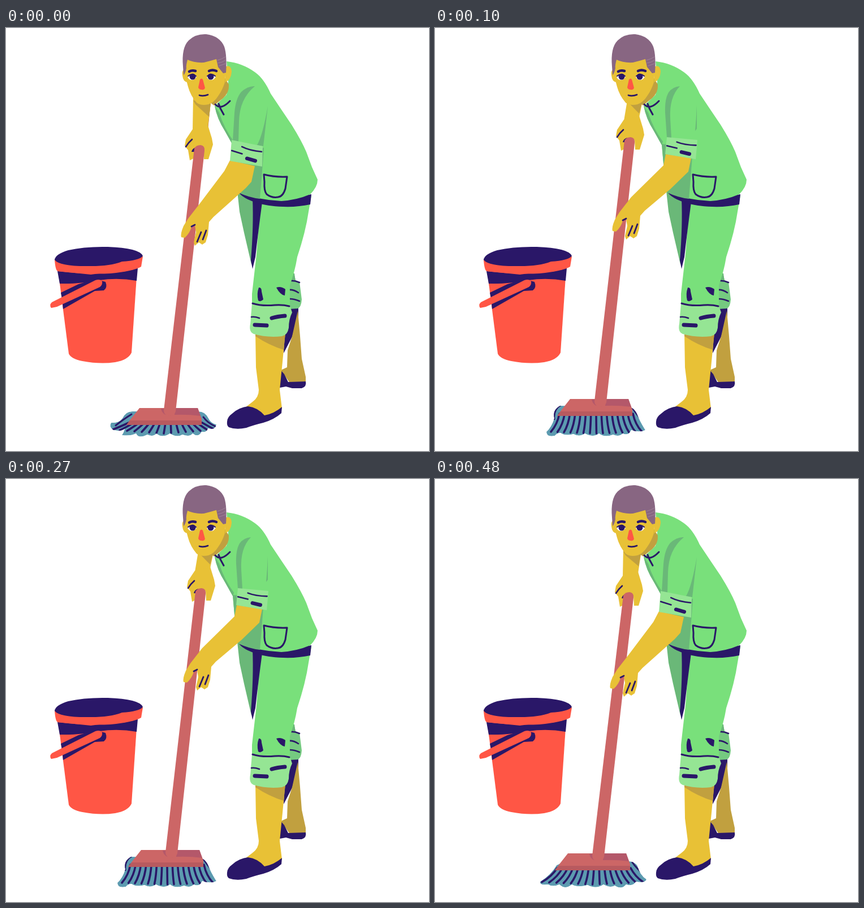
An HTML page with a canvas that plays this animation: 748x748 px, repeating every 0.56 s.

```html
<!DOCTYPE html>
<html lang="en">
<head>
<meta charset="utf-8">
<title>Mopping</title>
<style>
html, body { margin: 0; width: 100%; height: 100%; overflow: hidden; background: #fff; }
canvas { display: block; width: 748px; height: 748px; }
</style>
</head>
<body>
<canvas id="stage" width="748" height="748"></canvas>
<script>
const ctx = document.getElementById('stage').getContext('2d');
const C = {
  skin: '#e8c136', skinDark: '#c1a03f', green: '#79e07b', greenDark: '#6ab878',
  cuff: '#95e594', navy: '#2a1768', hair: '#886682', pink: '#cc6666',
  pinkDark: '#b4586a', band: '#b85a5f', red: '#ff5645', teal: '#5c9bb0', white: '#fff'
};

function fill(d, color) {
  ctx.fillStyle = color;
  ctx.fill(new Path2D(d));
}
function line(d, width = 3, color = C.navy) {
  ctx.strokeStyle = color;
  ctx.lineWidth = width;
  ctx.lineCap = ctx.lineJoin = 'round';
  ctx.stroke(new Path2D(d));
}
function shifted([x, y], draw) {
  ctx.save();
  ctx.translate(x, y);
  draw();
  ctx.restore();
}
const lerp = (a, b, t) => a + (b - a) * t;
const poly = pts => 'M' + pts.map(p => p.join(' ')).join('L') + 'Z';

// Front arm: cuff corners, forearm edges, hand shift, sleeve shadows
const arms = {
  low: {
    cuff: [[399, 198], [454, 209], [453, 245], [396, 235]],
    inner: [[396, 234], [386, 253]], outer: [[424, 283], [434, 272], [440, 244]], hand: [0, 0],
    crease: 'M440 103Q428 102 416 113Q406 125 404 150L401 199L411 201L412 165Q413 125 440 103Z',
    side: 'M463 138L455 209L444 207Q454 190 463 138Z'
  },
  mid: {
    cuff: [[403, 197], [459, 206], [457, 244], [399, 232]],
    inner: [[401, 233], [396, 252]], outer: [[430, 278], [439, 268], [444, 242]], hand: [2, -5],
    crease: 'M437 103Q425 102 415 113Q406 126 405 150L404 198L413 200L413 165Q414 125 437 103Z',
    side: 'M463 138L459 206L453 205Q460 180 463 138Z'
  },
  high: {
    cuff: [[410, 193], [464, 198], [461, 232], [407, 223]],
    inner: [[408, 223], [404, 243]], outer: [[416, 285], [448, 254], [453, 230]], hand: [4, -11],
    crease: 'M433 103Q420 104 413 114Q406 126 407 150L410 194L418 194L416 160Q414 122 433 103Z',
    side: 'M463 137L463 178L460 182Q462 160 463 137Z'
  },
  top: {
    cuff: [[408, 194], [463, 197], [461, 230], [405, 222]],
    inner: [[407, 222], [403, 242]], outer: [[415, 283], [448, 254], [452, 229]], hand: [5, -23],
    crease: 'M426 105Q413 106 406 117Q400 130 401 150Q403 175 407 195L417 195Q411 170 411 145Q411 120 426 105Z',
    side: 'M463 137L461 197L456 196Q460 170 463 137Z'
  }
};

// Mop: plate shift, handle top shift, back hand shift, forearm top, bristles
const mops = {
  low: {
    plate: [0, 0], grip: [0, 0], hand: [0, 0], sleeve: 331, tips: [188, 370], bend: .55,
    hair: 'M226 678Q212 677 206 690Q200 699 186 698Q181 705 190 711Q204 714 210 709Q208 716 205 720Q220 722 230 717Q234 727 250 719Q260 724 266 717Q276 726 290 717Q302 725 312 719Q325 724 330 717Q340 725 346 714Q355 716 357 708Q370 712 372 701Q362 699 358 690Q352 678 340 678Z'
  },
  mid: {
    plate: [-1, -10], grip: [0, -7], hand: [2, -8], sleeve: 333, tips: [189, 368], bend: .35,
    hair: 'M215 683Q205 700 186 712Q184 719 200 717Q208 722 220 717Q230 727 242 717Q252 723 270 718Q285 726 298 717Q310 724 318 719Q330 727 338 717Q350 721 355 712Q372 715 374 708Q362 700 358 684Q352 676 343 676L230 676Z'
  },
  high: {
    plate: [3, -16], grip: [2, -14], hand: [4, -17], sleeve: 341, tips: [205, 366], bend: .25,
    hair: 'M221 668Q207 676 211 690Q206 706 197 714Q197 724 212 721Q216 716 222 716Q230 722 245 718Q255 724 265 717Q280 725 290 717Q300 725 315 719Q325 724 332 717Q342 722 347 711Q362 716 372 711Q362 695 357 682Q352 672 344 670Z'
  },
  top: {
    plate: [2, -25], grip: [2, -21], hand: [4, -25], sleeve: 340, tips: [210, 369], bend: .15,
    hair: 'M222 655Q205 664 208 680Q202 694 207 705Q212 712 205 722Q214 729 222 716L230 708Q236 714 231 724Q240 729 244 712Q255 709 262 718Q270 712 275 716Q277 728 289 725Q290 715 297 712Q310 722 322 711Q330 722 340 714Q350 724 358 720Q368 728 374 718Q364 705 360 690Q362 672 353 660Q350 650 340 652Z'
  }
};

// [end time in ms, mop pose, arm pose]
const steps = [
  [70, 'low', 'low'], [100, 'mid', 'mid'], [170, 'high', 'high'], [270, 'top', 'top'],
  [330, 'high', 'high'], [360, 'mid', 'mid'], [560, 'mid', 'low']
];

function bucket() {
  fill('M92 428L111 576Q115 585 135 589Q166 595 193 591Q216 587 222 574L232 425Z', C.red);
  fill('M91 430L95 452Q130 453 165 446Q198 441 231 447L233 425L150 436Z', C.navy);
  fill('M86 409Q87 427 91 430Q140 436 185 434Q225 430 239 422L242 404Z', C.red);
  fill('M86 410Q87 400 110 393Q140 386 180 387Q236 389 242 403Q236 411 205 413Q185 421 150 421Q95 422 86 410Z', C.navy);
  fill('M97 468L128 453L158 444L176 449Q180 459 173 464L157 465L101 497L99 478Z', C.navy);
  fill('M98 452L126 453L97 464Z', C.red);
  fill('M81 485Q76 490 80 495L90 493L166 458Q171 454 170 448Q166 443 158 446Z', C.red);
}

function legs() {
  fill('M409 288L413 325L421 362L434 418L448 312L460 300Z', C.greenDark);
  fill('M502 494L517 494L517 510L506 546L491 575L492 540Z', C.navy);
  fill('M516 500L520 545L523 585L530 617L530 626L503 629L486 605L497 600L498 570L506 545Z', C.skinDark);
  fill('M485 604L492 612L499 626L530 625Q532 634 523 637L506 637L495 634L479 637Z', C.navy);
  fill('M500 440L510 438L512 446L519 449L523 480Q522 494 516 496L500 497Z', '#75ca80');
  fill('M501 432L510 434L512 448L500 449Z', C.greenDark);
  line('M500 447Q510 446 519 450M500 463Q508 462 517 468M502 479Q510 479 519 483', 2.6);

  fill('M441 538L442 600L447 640Q447 653 436 661L423 671L459 688L488 673L484 640L489 590L494 538Z', C.skin);
  fill('M441 540L494 540L491 569Q465 561 441 545Z', C.skinDark);
  fill('M391 696Q391 688 401 681Q412 671 428 669Q445 671 457 685Q474 682 488 670L487 681Q475 692 455 698Q438 702 425 707Q407 711 394 706Q390 703 391 696Z', C.navy);

  fill('M450 305L443 400L435 470L435 490L502 492L502 455Q511 430 515 405Q530 360 535 325L540 296Z', C.green);
  fill('M436 302L453 308Q446 360 441 405L436 426L433 411Q438 350 436 302Z', C.navy);
  fill('M410 289Q440 299 490 303L540 294L538 312Q515 317 490 316Q460 315 445 309Q420 303 410 289Z', C.navy);
  fill('M435 487L502 491L506 503Q500 515 500 530Q498 543 488 545Q462 548 438 541Q429 537 432 523Z', C.cuff);
  line('M436 487Q452 492 475 490Q490 489 501 492');
  line('M434 511Q440 510 448 513', 2.6);
  line('M470 513Q480 510 493 509', 7);
  line('M440 525L461 526', 7);
  fill('M447 459Q452 458 452 466L455 480Q450 485 446 482Q443 470 447 459Z', C.navy);
  fill('M478 459Q486 456 494 462L493 473Q485 472 478 459Z', C.navy);
}

function torso(a) {
  fill('M390 59Q418 62 440 78Q456 89 468 116Q486 143 505 171Q523 200 531 219L541 246L551 268Q551 281 538 294Q515 304 487 306Q445 304 411 291L404 240L401 207L387 182Q373 160 369 138L390 118L393 95Z', C.green);
  fill('M369 137L377 150Q386 178 403 201L401 207L387 182Q373 160 369 137Z', C.greenDark);
  fill('M401 205L404 240L411 291Q430 300 449 302L454 240L456 212L430 207Z', C.greenDark);
  fill(a.crease, C.greenDark);
  fill(a.side, C.greenDark);
  line('M456 259Q475 264 497 263L494 284Q490 298 481 299Q470 301 461 294Q456 288 457 272Z');
}

function head() {
  fill('M387 88L394 100Q395 114 384 124L368 137L361 132Z', C.skinDark);
  line('M370 135Q380 146 396 129M376 134L379 142L385 153');
  fill('M386 69Q398 63 399 77Q398 92 388 96Z', C.skin);
  fill('M319 72Q310 73 312 84Q313 95 321 96Z', C.skin);
  fill('M317 53L376 50L388 75L387 96Q383 109 376 119Q368 132 358 135Q345 138 337 132Q326 119 322 104L316 82Z', C.skin);
  fill('M313 68Q310 35 323 22Q335 10 354 11Q378 14 386 33Q391 48 389 79L384 80L375 69L372 55Q362 58 350 61Q333 62 321 56Q318 67 319 71Q317 81 314 83Z', C.hair);
  line('M374 57Q382 55 388 51M375 62Q382 61 388 57M377 67L388 63', .8, '#a58ba0');
  line('M324 77Q329 74 335 76M359 76Q365 73 372 76', 4.5);
  for (const [x, p] of [[329, 330], [363, 362]]) {
    fill(`M${x - 8} 86Q${x} 78 ${x + 8} 86Q${x + 5} 92 ${x} 92Q${x - 6} 92 ${x - 8} 86Z`, C.white);
    ctx.fillStyle = C.navy;
    ctx.beginPath();
    ctx.arc(p, 86, 5.5, 0, 7);
    ctx.fill();
    line(`M${x - 7} 85Q${x} 79 ${x + 7} 85`, 2);
  }
  fill('M343 91Q346 88 348 91L352 106Q350 110 346 109Q341 109 340 105Z', C.red);
  line('M342 119Q349 121 357 118', 2.8);
}

function backArm(m) {
  const [hx, hy] = m.hand, s = m.sleeve;
  fill(poly([[350, 130], [362, 130], [357 + hx / 3, 180 + hy], [346, 180 + hy]]), C.pinkDark);
  const right = 362 + hx;
  fill(poly([[s, 122], [330 + hx, 181 + hy], [340, 195 + hy], [357 + hx, 175 + hy], [right, 134]]), C.skin);
  fill(poly([[s, 128], [s + 4, 135], [359 + hx / 2, 157 + hy / 3], [right, 132]]), C.skinDark);
  shifted(m.hand, () => {
    fill('M330 179L318 197L316 208L322 216L325 234L333 230L338 215L349 215L350 232L358 232L366 206L364 195L357 172Z', C.skin);
    line('M318 210L323 203L329 197', 2.6);
    fill('M328 219Q329 213 336 211L334 219Z', C.navy);
  });
}

function bristles(m) {
  ctx.save();
  ctx.clip(new Path2D(m.hair));
  fill(m.hair, C.teal);
  const y = 698 + m.plate[1], n = 15;
  for (let i = 0; i < n; i++) {
    const u = i / (n - 1);
    const a = lerp(217, 347, u) + m.plate[0], b = lerp(...m.tips, u);
    const end = 717 - 12 * m.bend * Math.abs(2 * u - 1);
    line(`M${a} ${y}Q${lerp(a, b, m.bend)} ${lerp(y, end, .6)} ${b} ${end}`, 3.6);
  }
  line(`M222 ${y - 15}Q209 ${y - 7} ${m.tips[0] + 6} ${lerp(y, 714, .3)}M349 ${y - 10}Q356 ${y} ${m.tips[1]} ${lerp(y, 714, .4)}`, 3);
  ctx.restore();
}

function mop(m) {
  bristles(m);
  shifted(m.plate, () => {
    fill('M236 672L339 672L346 691L346 702L213 702L221 691Z', C.pink);
    fill('M219 694L346 694L346 702L213 702Z', C.band);
    fill('M298 672L339 672L344 686Q320 683 298 684Z', C.pinkDark);
    fill('M274 673L283 673L283 684Q276 682 274 673Z', C.pinkDark);
  });
  const [gx, gy] = m.grip, [px, py] = m.plate;
  const g = (x, y) => `${x + gx} ${y + gy}`, p = (x, y) => `${x + px} ${y + py}`;
  fill(`M${g(333, 213)}Q${g(336, 207)} ${g(344, 207)}Q${g(352, 208)} ${g(351, 217)}L${p(300, 678)}Q${p(298, 686)} ${p(289, 686)}Q${p(279, 685)} ${p(279, 676)}Z`, C.pink);
}

function frontArm(a) {
  const [hx, hy] = a.hand;
  const at = (x, y) => `${x + hx} ${y + hy}`;
  const pts = list => list.map(p => 'L' + p.join(' ')).join('');
  fill(`M${pts(a.inner).slice(1)}L${at(343, 310)}L${at(322, 337)}L${at(314, 350)}Q${at(308, 364)} ${at(310, 370)}L${at(316, 371)}Q${at(325, 363)} ${at(328, 352)}L${at(334, 349)}L${at(336, 361)}L${at(332, 379)}L${at(334, 385)}L${at(341, 379)}L${at(347, 383)}L${at(353, 379)}L${at(357, 366)}L${at(359, 343)}L${at(367, 334)}${pts(a.outer)}Z`, C.skin);
  shifted(a.hand, () => line('M328 351L334 348M345 361L338 378M354 358L348 374', 2.8));

  const [tl, tr, br, bl] = a.cuff;
  fill(poly(a.cuff), C.cuff);
  const on = (u, v) => [0, 1].map(k => lerp(lerp(tl[k], tr[k], u), lerp(bl[k], br[k], u), v)).join(' ');
  line(`M${on(.34, .22)}Q${on(.6, .34)} ${on(.97, .28)}M${on(.03, .5)}L${on(.36, .56)}`, 2.6);
  line(`M${on(.52, .74)}L${on(.78, .78)}`, 6.5);
}

function draw(now) {
  const t = now % 560;
  const [, mopPose, armPose] = steps.find(s => t < s[0]);
  const m = mops[mopPose], a = arms[armPose];
  ctx.fillStyle = C.white;
  ctx.fillRect(0, 0, 748, 748);
  bucket();
  legs();
  backArm(m);
  torso(a);
  mop(m);
  head();
  frontArm(a);
}

const start = performance.now();
function tick() {
  draw(performance.now() - start);
  requestAnimationFrame(tick);
}
tick();
</script>
</body>
</html>
```
